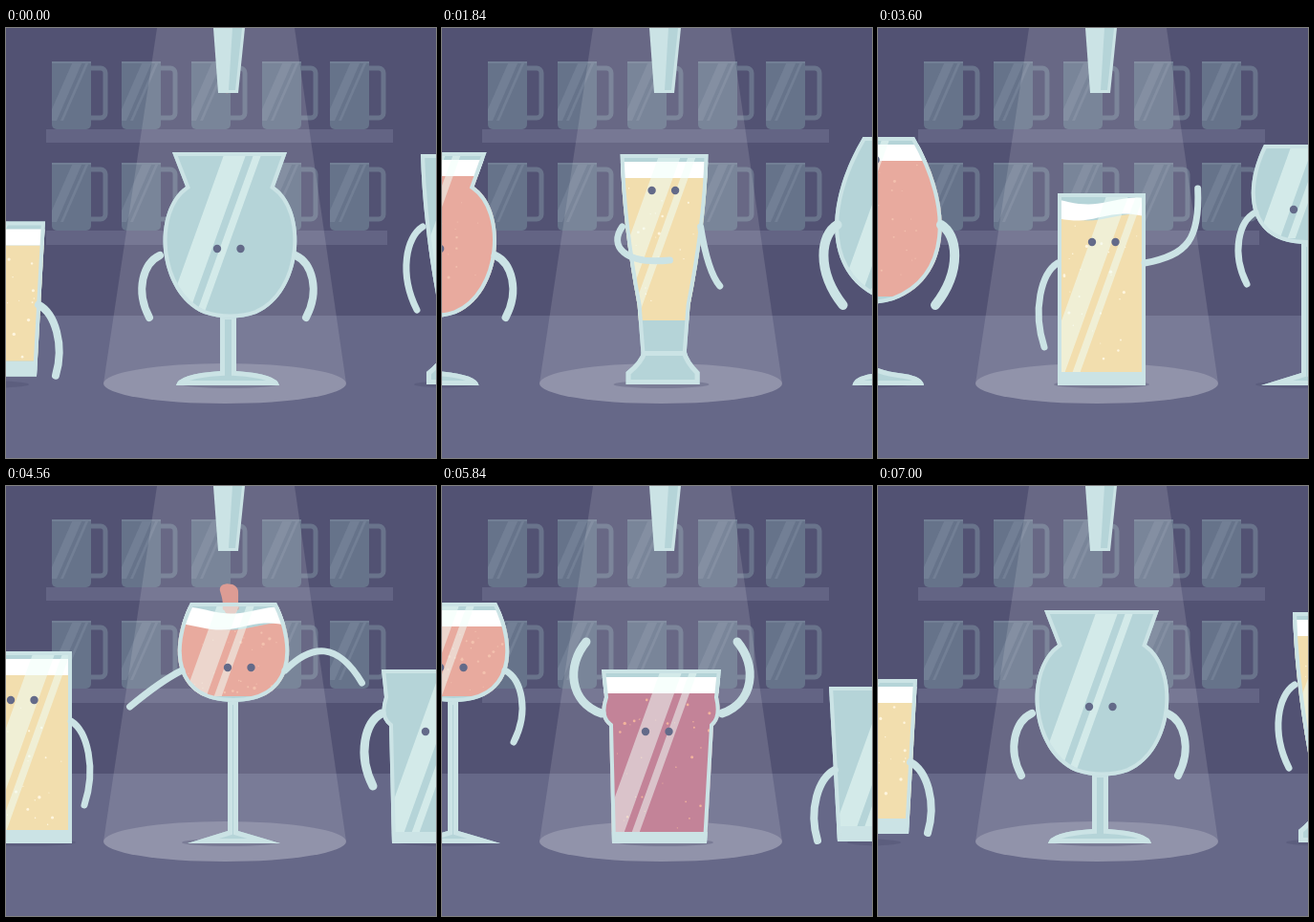
An HTML page with a canvas that plays this animation: 450x450 px, repeating every 7040 ms.

```html
<!DOCTYPE html>
<html lang="en">
<head>
<meta charset="utf-8">
<title>Bar parade</title>
<style>
html, body { margin: 0; width: 100%; height: 100%; overflow: hidden; background: #525273; }
canvas { display: block; }
</style>
</head>
<body>
<canvas width="450" height="450"></canvas>
<script>
const ctx = document.querySelector('canvas').getContext('2d');
const LOOP = 7040, TURN = LOOP / 7, ROW = 1686;
const LIGHT = '#cbe3e5', BODY = '#b5d4d8', EYE = '#636a89';
const YELLOW = ['#f2deae', '#eed69c', '#fff6df'];
const SALMON = ['#e8aa9e', '#dd9c94', '#f3c1ae'];
const MAUVE = ['#c38398', '#b87990', '#f2b39c'];

// Gestures: two bezier controls and the hand, measured outward from the shoulder.
const spread = [28, -28, 55, -30, 82, 13];
const stretch = [20, 10, 40, 26, 56, 38];
const hug = [-10, 36, -80, 46, -73, 11];
const belly = [14, 20, -2, 40, -46, 35];
const hang = [4, 25, 10, 50, 24, 62];
const wave = [45, -8, 58, -25, 54, -78];
const cheer = [34, -12, 37, -50, 20, -75];

// x: place in the row, sides/shoulder: arm roots, hand: resting hand, floor: lowest liquid
const glasses = [
  { x: 0, top: 130, floor: 298, drink: SALMON, eye: [221, 231], sides: [161, 303], shoulder: 238,
    hand: [11, 65], arm: 8, left: spread, right: spread, shine: 229,
    bowl: 'M174 130H294L281 166C317 191 312 277 262 299Q235 308 207 299C157 277 152 191 188 166Z',
    foot: 'M224 300H241V359Q284 362 286 374H178Q180 362 224 359Z' },
  { x: 243, top: 132, floor: 306, drink: YELLOW, eye: [224, 170], sides: [193, 275], shoulder: 208,
    hand: [6, 87], arm: 7, left: belly, right: hang, shine: 232,
    bowl: 'M191 132H283Q281 205 264 290L260 342H213L209 290Q193 205 191 132Z',
    foot: 'M214 338H260Q262 348 274 360V373H197V360Q212 348 214 338Z' },
  { x: 497, top: 114, floor: 281, drink: SALMON, eye: [225, 138], sides: [164, 318], shoulder: 206,
    hand: [-6, 84], arm: 10, left: hug, right: hug, shine: 226,
    bowl: 'M191 114H290C334 190 328 263 268 285Q240 293 213 285C152 263 146 190 191 114Z',
    foot: 'M233 286H246V353Q255 359 280 362Q299 365 300 374H180Q181 365 200 362Q225 359 233 353Z' },
  { x: 749, top: 173, floor: 360, drink: YELLOW, eye: [216, 224], sides: [188, 279], shoulder: 246,
    hand: [14, 88], arm: 7, right: wave, shine: 240, base: true,
    bowl: 'M188 173H280V374H188Z' },
  { x: 960, top: 122, floor: 220, drink: SALMON, eye: [224, 190], sides: [184, 292], shoulder: 193,
    hand: [9, 75], arm: 7, left: stretch, right: spread, shine: 222,
    bowl: 'M193 122H283C307 170 302 226 238 226C174 226 169 170 193 122Z',
    foot: 'M232 224H243V361L287 374H190L232 361Z' },
  { x: 1186, top: 192, floor: 362, drink: MAUVE, eye: [213, 257], sides: [167, 293], shoulder: 238,
    hand: [9, 76], arm: 9, left: cheer, right: cheer, shine: 229, base: true,
    bowl: 'M167 192H292L289 221Q294 242 284 251L277 374H178L175 251Q163 242 170 221Z' },
  { x: 1426, top: 210, floor: 356, drink: YELLOW, eye: [222, 255], sides: [171, 294], shoulder: 297,
    hand: [18, 74], arm: 8, left: wave, right: wave, shine: 224, base: true, hop: 8,
    bowl: 'M165 210H301L292 372H174Z' }
];
for (const g of glasses) {
  g.bowl = new Path2D(g.bowl);
  if (g.foot) g.foot = new Path2D(g.foot);
}

const clamp = v => Math.max(0, Math.min(1, v));
const ramp = (a, b, v) => clamp((v - a) / (b - a));
const smooth = (a, b, v) => { const k = ramp(a, b, v); return k * k * (3 - 2 * k); };
const mix = (a, b, k) => a + (b - a) * k;
const rand = n => { const v = Math.sin(n * 91.7) * 4373.3; return v - Math.floor(v); };
const fall = ms => 68 + 0.3 * ms + 0.0156 * ms * ms;

function poly(color, ...pts) {
  ctx.fillStyle = color;
  ctx.beginPath();
  for (let i = 0; i < pts.length; i += 2) ctx.lineTo(pts[i], pts[i + 1]);
  ctx.fill();
}

function oval(color, x, y, rx, ry) {
  ctx.fillStyle = color;
  ctx.beginPath();
  ctx.ellipse(x, y, rx, ry, 0, 0, 7);
  ctx.fill();
}

function rect(color, x, y, w, h) {
  ctx.fillStyle = color;
  ctx.fillRect(x, y, w, h);
}

function mug(x, y) {
  ctx.strokeStyle = '#69738b';
  ctx.lineWidth = 5;
  ctx.beginPath();
  ctx.roundRect(x + 36, y + 7, 20, 52, 5);
  ctx.stroke();
  ctx.fillStyle = '#66738a';
  ctx.beginPath();
  ctx.roundRect(x, y, 41, 71, [0, 0, 5, 5]);
  ctx.fill();
  rect('#727f95', x, y, 41, 2);
  poly('#727f95', x + 22, y, x + 32, y, x + 5, y + 62, x, y + 62, x, y + 50);
  poly('#727f95', x + 36, y, x + 39, y, x + 12, y + 62, x + 9, y + 62);
}

function room() {
  rect('#525273', 0, 0, 450, 301);
  rect('#666888', 0, 301, 450, 149);
  rect('#636484', 42, 106, 363, 14);
  rect('#636484', 42, 212, 357, 15);
  for (const x of [48, 121, 194, 268, 339]) { mug(x, 35); mug(x, 141); }
  ctx.fillStyle = 'rgba(255,255,255,.125)';
  ctx.beginPath();
  ctx.moveTo(158, 0);
  ctx.lineTo(302, 0);
  ctx.lineTo(356, 372);
  ctx.ellipse(229, 372, 127, 21, 0, 0, Math.PI);
  ctx.fill();
  oval('rgba(255,255,255,.18)', 229, 372, 127, 21);
}

function tap() {
  poly(LIGHT, 217, 0, 250, 0, 243, 68, 222, 68);
  poly(BODY, 237, 0, 247, 0, 240, 65, 233, 65);
}

function stream(color, p, surface) {
  const from = p < 500 ? 66 : fall(p - 500);
  const to = Math.min(fall(p), surface);
  if (p <= 0 || from >= to) return;
  const round = 8;
  ctx.fillStyle = color;
  ctx.beginPath();
  const edge = (y, side) => {
    const cap = Math.min(1, (to - y) / round, p < 500 ? 1 : (y - from) / round);
    const half = (y < 130 ? 9 : 7.5) * Math.sqrt(Math.max(0, 1 - (1 - cap) ** 2));
    const sway = 2 * Math.sin(y / 13 - p / 25) + Math.sin(y / 6 + side - p / 18);
    ctx.lineTo(234 + sway + side * half, y);
  };
  for (let y = from; y <= to; y += 1) edge(y, -1);
  for (let y = to; y >= from; y -= 1) edge(y, 1);
  ctx.fill();
}

// Fills everything between two wavy heights.
function layer(color, top, bottom, wobble) {
  ctx.fillStyle = color;
  ctx.beginPath();
  for (let x = 140; x <= 330; x += 5) ctx.lineTo(x, top + wobble(x));
  for (let x = 330; x >= 140; x -= 5) ctx.lineTo(x, bottom(x));
  ctx.fill();
}

function contents(g, p, t, seed) {
  const full = ramp(105, 525, p);
  const level = mix(g.floor, g.top + 25, full);
  const foam = 17 * ramp(0, 0.25, full);
  const slosh = 3.5 * smooth(100, 200, p) * (1 - smooth(590, 790, p));
  const wobble = x => slosh * Math.sin(x / 16 + p / 45);
  stream(g.drink[1], p, full ? level - foam + 5 : g.floor);
  if (!full) return;
  ctx.save();
  ctx.clip(g.bowl);
  layer(g.drink[0], level, () => g.floor, wobble);
  const depth = g.floor - g.top - 32;
  for (let i = 0; i < 34; i++) {
    const k = seed * 50 + i + 1;
    const rise = (rand(k) + t / LOOP * (2 + i % 3)) % 1;
    const y = g.floor - 4 - rise * depth;
    const x = g.eye[0] - 42 + rand(k + 400) * 112 + 2 * Math.sin(y / 9 + i);
    const r = 0.5 + 1.2 * rand(k + 800) ** 2;
    if (y > level + 4) oval(g.drink[2], x, y, r, r);
  }
  layer('#fff', level - foam, x => level + wobble(x + 12), wobble);
  ctx.restore();
}

function arm(g, dir, p) {
  const [hx, hy] = g.hand;
  const rest = [17, hy * 0.12, 24 + hx * 0.2, hy * 0.56, hx, hy];
  const pose = (dir < 0 ? g.left : g.right) || rest;
  const k = smooth(25, 110, p) * (1 - smooth(835, 955, p));
  const sway = pose === rest ? 0 : 4 * k * Math.sin((p - 560) / 55);
  const c = rest.map((v, i) => mix(v, pose[i], k));
  const x = g.sides[dir < 0 ? 0 : 1], y = g.shoulder;
  ctx.strokeStyle = LIGHT;
  ctx.lineWidth = g.arm;
  ctx.lineCap = 'round';
  ctx.beginPath();
  ctx.moveTo(x, y);
  ctx.bezierCurveTo(x + dir * c[0], y + c[1], x + dir * c[2], y + c[3],
    x + dir * (c[4] + sway), y + c[5]);
  ctx.stroke();
}

function outline(path, width) {
  ctx.save();
  ctx.clip(path);
  ctx.strokeStyle = LIGHT;
  ctx.lineWidth = width * 2;
  ctx.stroke(path);
  ctx.restore();
}

function glare(g) {
  const y = g.top, h = g.floor - y, dx = -h * 0.36;
  ctx.save();
  ctx.clip(g.bowl);
  for (const [from, w] of [[0, 23], [31, 8]]) {
    const x = g.shine + from;
    poly('rgba(240,255,250,.52)', x, y, x + w, y, x + w + dx, y + h, x + dx, y + h);
  }
  ctx.restore();
}

function glass(g, i, x, p, t) {
  // the second glass is already served when it queues up again
  const pour = i === 1 && t > TURN ? t - TURN : p;
  const hop = (g.hop || 0) * Math.sin(Math.PI * ramp(820, 1120, p));
  ctx.save();
  ctx.translate(x, 0);
  oval('rgba(70,70,105,.3)', 234, 373, 50, 4);
  ctx.translate(0, -hop);
  if (g.foot) {
    ctx.fillStyle = BODY;
    ctx.fill(g.foot);
    outline(g.foot, 5);
  }
  ctx.fillStyle = BODY;
  ctx.fill(g.bowl);
  if (g.base) {
    ctx.save();
    ctx.clip(g.bowl);
    rect(LIGHT, 140, g.floor, 190, 30);
    ctx.restore();
  }
  contents(g, pour, t, i);
  glare(g);
  outline(g.bowl, 4);
  const look = 8 * smooth(490, 530, p) * (1 - smooth(650, 710, p));
  const open = Math.max(0.25, ramp(0, 30, Math.abs(p - 468)));
  for (const side of [0, 24.5]) oval(EYE, g.eye[0] + side + look, g.eye[1], 4.2, 4.2 * open);
  arm(g, -1, p);
  arm(g, 1, p);
  ctx.restore();
}

function draw(t) {
  room();
  const turn = Math.floor(t / TURN);
  const k = ramp(810, 965, t - turn * TURN);
  const move = k < 0.5 ? 4 * k ** 3 : 1 - 4 * (1 - k) ** 3;
  const next = turn < 6 ? glasses[turn + 1].x : ROW;
  const scroll = mix(glasses[turn].x, next, move);
  glasses.forEach((g, i) => {
    for (const lap of [-1, 0, 1]) {
      const x = g.x + lap * ROW - scroll;
      if (Math.abs(x) < 420) glass(g, i, x, t - i * TURN - lap * LOOP, t);
    }
  });
  tap();
}

const start = performance.now();
function frame() {
  draw((performance.now() - start) % LOOP);
  requestAnimationFrame(frame);
}
frame();
</script>
</body>
</html>
```
